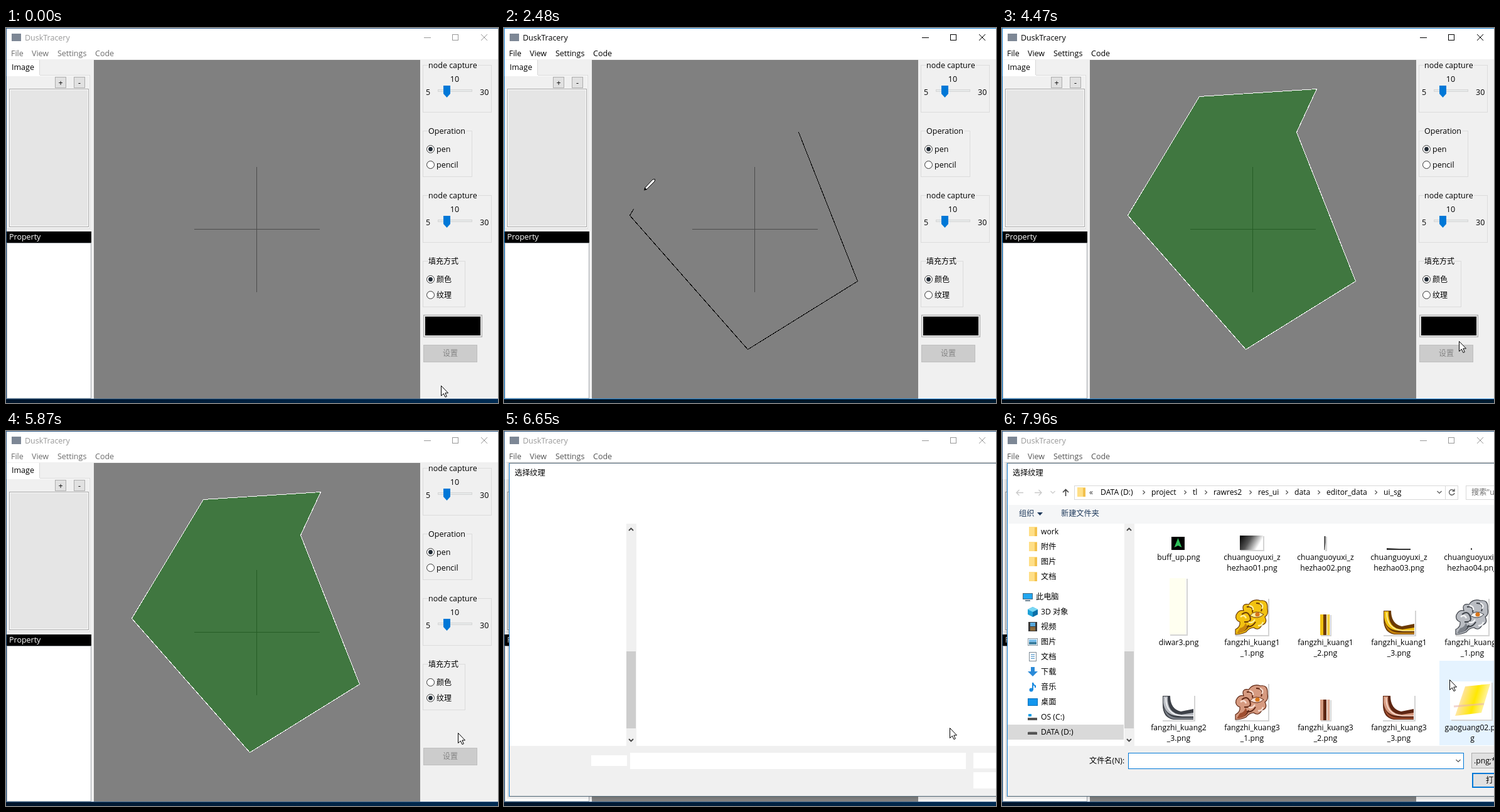
An HTML page that plays this animation: 784x599 px, repeating every 8 s.

```html
<!DOCTYPE html>
<html lang="zh">
<head>
<meta charset="utf-8">
<title>Polygon fill</title>
<style>
html, body { margin: 0; width: 100%; height: 100%; overflow: hidden; background: #f0f0f0; }
svg { display: block; width: 784px; height: 599px; }
text { font: 12.5px "Open Sans", "Noto Sans CJK SC", "Noto Sans CJK", sans-serif; white-space: pre; }
.cjk { font-size: 12px; }
.dlg text { font-size: 12.2px; }
.crisp, rect { shape-rendering: crispEdges; }
</style>
</head>
<body>
<svg id="stage" viewBox="0 0 784 599"></svg>
<script>
const STEP = 77.27, LOOP = 8000;

// Drawing helpers, all returning SVG markup
const box = (x, y, w, h, fill, line) => line
  ? `<rect x="${x + .5}" y="${y + .5}" width="${w - 1}" height="${h - 1}" fill="${fill}" stroke="${line}"/>`
  : `<rect x="${x}" y="${y}" width="${w}" height="${h}" fill="${fill}"/>`;
const text = (x, y, s, fill = '#000', anchor = 'start') =>
  `<text x="${x}" y="${y}" fill="${fill}" text-anchor="${anchor}"${/^[\u4e00-\u9fff]/.test(s) ? ' class="cjk"' : ''}>${s}</text>`;
const path = (d, stroke, width = 1, fill = 'none', extra = '') =>
  `<path d="${d}" stroke="${stroke}" stroke-width="${width}" fill="${fill}" ${extra}/>`;
const shape = (d, fill) => path(d, 'none', 0, fill);
const crisp = 'class="crisp"';
const at = (x, y, s) => `<g transform="translate(${x} ${y})">${s}</g>`;
// Content visible from step a up to step b
const during = (a, b, s) => `<g data-a="${a}" data-b="${b}">${s}</g>`;
const from = (a, s) => during(a, 999, s);
const chevron = (x, y, dir, color = '#555', w = 1.2) => path({
  r: `M${x - 1.5} ${y - 3}l3 3l-3 3`,
  d: `M${x - 3.5} ${y - 2}l3.5 3.5l3.5-3.5`,
  u: `M${x - 3.5} ${y + 2}l3.5-3.5l3.5 3.5`
}[dir], color, w);

// Main window
function frame(ink, menu, edge) {
  const names = { File: 8, View: 41, Settings: 82, Code: 142 };
  return path('M0 .5H784M.5 0V593M0 592.5H784', edge, 1, 'none', crisp) +
    text(30, 20, 'DuskTracery', ink) +
    Object.entries(names).map(([s, x]) => text(x, 45, s, menu)).join('') +
    path('M666 15.5H677M711.5 10.5H720.5V19.5H711.5Z', ink, 1, 'none', crisp) +
    path('M757 10l10 10M767 10l-10 10', ink);
}

function group(x, y, w, h, label, labelWidth) {
  const d = `M${x + 8.5} ${y + .5}H${x + .5}v${h - 1}h${w - 1}v${1 - h}H${x + 8 + labelWidth}`;
  return path(d, '#dcdcdc', 1, 'none', crisp) + text(x + 9, y + 5, label);
}

function slider(y) {
  return group(664, y, 110, 76, 'node capture', 80) +
    text(715, y + 27, '10', '#000', 'middle') + text(669, y + 48, '5') + text(755, y + 48, '30') +
    box(688, y + 39, 55, 4, '#e7eaea', '#d6d6d6') +
    shape(`M697 ${y + 33}h11v13l-5.5 6l-5.5-6z`, '#0078d7');
}

const radio = (y, label) =>
  `<circle cx="676.5" cy="${y}" r="6" fill="#fff" stroke="#333"/>` + text(686, y + 4.5, label);
const dot = y => `<circle cx="676.5" cy="${y}" r="3.4" fill="#222b35"/>`;
const smallButton = (x, s) => box(x, 78, 18, 18, '#e1e1e1', '#adadad') + text(x + 9, 92, s, '#000', 'middle');
const swatch = (fill, line) =>
  box(665, 458, 94, 36, fill, line) + box(668, 461, 88, 30, '#000');

const leftPane =
  box(1, 75, 133, 246, '#f0f0f0', '#dcdcdc') + box(2, 76, 131, 244, 'none', '#fafafa') +
  box(1, 51, 53, 26, '#fff') + path('M53.5 51V75', '#d9d9d9', 1, 'none', crisp) + text(9, 67, 'Image') +
  smallButton(78, '+') + smallButton(108, '-') +
  box(5, 97, 127, 221, '#fff', '#a5a5a5') + box(7, 99, 123, 217, '#e5e5e5') +
  box(1, 343, 135, 249, '#fff', '#a0a5aa') + box(1, 325, 135, 18, '#000') + text(5, 338, 'Property', '#fff');

const rightPane =
  slider(59) + group(664, 164, 79, 74, 'Operation', 62) + radio(193.5, 'pen') + dot(193.5) + radio(218.5, 'pencil') +
  slider(267) + group(664, 372, 68, 74, '填充方式', 0) +
  radio(401.5, '颜色') + radio(426.5, '纹理') + during(0, 69, dot(401.5)) + from(69, dot(426.5)) +
  during(0, 69, swatch('#e1e1e1', '#adadad')) + `<g id="hover">${swatch('#e5f1fb', '#0078d7')}</g>` +
  box(665, 506, 86, 28, '#ccc', '#bfbfbf') + text(708, 524, '设置', '#838383', 'middle');

const corners = [[469, 166], [563, 404], [388, 513], [200, 299], [314, 109], [501, 97]];
const clickSteps = [19, 24, 27, 31, 39];

const canvas =
  box(140, 51, 520, 541, '#808080') +
  path('M399.5 222V422M300 321.5H500', '#4d4d4d', 1, 'none', crisp) +
  `<polyline id="line" fill="none" stroke="#000" ${crisp}/>` +
  from(47, `<polygon points="${corners}" transform="translate(.5 .5)" fill="rgb(0 110 0 / .5)" stroke="#fff" ${crisp}/>`);

const mainWindow =
  `<linearGradient id="desk"><stop stop-color="#00142a"/><stop offset="1" stop-color="#002b52"/></linearGradient>` +
  box(0, 592, 784, 7, 'url(#desk)') + during(3, 76, box(0, 593, 784, 6, 'rgb(0 8 8 / .45)')) +
  box(0, 0, 784, 592, '#f0f0f0') + box(0, 0, 784, 50, '#fff') +
  box(9, 9, 15, 12, '#7d8795') + leftPane + canvas + rightPane +
  during(0, 3, frame('#999', '#6d6d6d', '#2c5a88')) + during(3, 76, frame('#000', '#000', '#1883d7')) +
  during(76, 83, frame('#999', '#6d6d6d', '#2c5a88')) + from(83, frame('#999', '#555', '#2c5a88'));

// File dialog
const folder = (x, y) => box(x, y, 13, 15, '#ffdf87') + box(x + 9, y + 1, 4, 14, '#f2c14e');
const screen = (x, y) => box(x, y, 16, 10, '#22a7f0', '#4a6a80') + box(x + 4, y + 11, 8, 2, '#6a7f8f');
const icons = {
  folder: folder(2, 0),
  pc: screen(0, 2),
  cube: shape('M0 4l8-4l8 4v8l-8 4l-8-4z', '#1fa2d8') + shape('M8 8l8-4v8l-8 4z', '#0c6fa8') + shape('M0 4l8-4l8 4l-8 4z', '#7bd8f4'),
  film: box(1, 0, 14, 15, '#3a3a3a') + box(4, 1, 8, 6, '#58a9dc') + box(4, 8, 8, 6, '#8a6a3a'),
  photo: box(0, 2, 16, 12, '#fff', '#8a9aa5') + box(2, 4, 12, 4, '#7cc0ec') + box(2, 8, 12, 4, '#3d7f9f'),
  page: box(2, 0, 12, 15, '#fff', '#7d8b96') + path('M5 4.5h6M5 7.5h6M5 10.5h6', '#3c8ac4'),
  down: shape('M5 0h6v7h5l-8 8l-8-8h5z', '#2a8ad8'),
  note: path('M8 13V1q1 4 4 5v3', '#1b8be0', 2) + `<circle cx="5.5" cy="12.5" r="3" fill="#1b8be0"/>`,
  desk: box(0, 2, 16, 12, '#1296ee', '#0a6fb8'),
  disk: box(0, 8, 15, 4, '#555') + box(1, 7, 13, 1, '#aaa'),
  sys: box(0, 9, 15, 4, '#555') + box(1, 3, 5, 4, '#1aa0e8')
};
const treeRows = [
  [161, 'folder', 'work'], [185, 'folder', '附件'], [209, 'folder', '图片'], [233, 'folder', '文档'],
  [265, 'pc', '此电脑'], [289, 'cube', '3D 对象'], [313, 'film', '视频'], [337, 'photo', '图片'],
  [361, 'page', '文档'], [385, 'down', '下载'], [409, 'note', '音乐'], [433, 'desk', '桌面'],
  [457, 'sys', 'OS (C:)'], [481, 'disk', 'DATA (D:)']
];
const tree = box(9, 469, 185, 24, '#d9d9d9') + treeRows.map(([y, icon, label]) => {
  const x = icon === 'pc' ? 33 : 41;
  return at(x, y - 8, icons[icon]) + text(x + 21, y + 4, label);
}).join('');

const crumbs = { 'DATA (D:)': 157, project: 238, tl: 304, rawres2: 337, res_ui: 408, data: 466, editor_data: 517, ui_sg: 608 };
const addressBar =
  path('M34 98.5H23M27.5 94l-4.5 4.5l4.5 4.5M52 98.5H63M58.5 94l4.5 4.5l-4.5 4.5', '#c9c9c9', 1.3) +
  chevron(81, 98, 'd', '#c9c9c9') + path('M101.5 104V93.5M97 98l4.5-4.5l4.5 4.5', '#444', 1.6) +
  box(115, 87, 612, 23, '#fff', '#d9d9d9') + path('M706.5 87V110', '#d9d9d9', 1, 'none', crisp) + folder(120, 90) +
  text(139, 102, '«', '#333') +
  Object.entries(crumbs).map(([s, x], i) => text(x, 102, s) + (i ? chevron(x - 12, 98, 'r') : '')).join('') +
  chevron(697, 98, 'd') + path('M720 95a4.3 4.3 0 1 0 1 4M721 92.5v3.5h-3.5', '#555', 1.3) +
  box(739, 87, 60, 23, '#fff', '#d9d9d9') + text(748, 102, '搜索"ui_sg"', '#6d6d6d');

const toolbar = text(27, 136, '组织', '#1e395b') + shape('M56 130h9l-4.5 5z', '#1e395b') + text(94, 136, '新建文件夹', '#1e395b');
const scrollbar = box(195, 148, 16, 355, '#f0f0f0') + box(195, 352, 15, 123, '#cdcdcd') +
  chevron(202.5, 157, 'u', '#444', 1.8) + chevron(202.5, 494, 'd', '#444', 1.8);

const footer =
  box(138, 515, 60, 24, '#f0f0f0') + text(139, 531, '文件名(N):') +
  box(201, 514, 535, 26, '#fff', '#0078d7') + chevron(727, 527, 'd') +
  box(748, 514, 40, 57, '#f0f0f0') + box(748, 514, 60, 25, '#e1e1e1', '#adadad') + text(752, 531, '.png;*.jpg') +
  box(749, 546, 60, 24, '#0078d7') + box(751, 548, 60, 20, '#e1e1e1') + text(771, 562, '打开');

// Thumbnails
const gold = ['#f2c211', '#6b3a06', '#fff0a0', '#c8860c'];
const silver = ['#b9bcc2', '#3d4148', '#f4f5f7', '#7d828a'];
const copper = ['#d69a80', '#5e2613', '#f8ddd0', '#a04f30'];
const card = (x, y, w, h) => box(x + 1, y + 1, w + 1, h + 1, '#d4d4d4') + box(x - 1, y - 1, w + 1, h + 1, '#fff');
const ornament = (x, y, [mid, dark, light, low]) => card(x, y, 53, 59) + at(x, y,
  path('M1 58V50Q9 46 8 38Q0 35 2 27Q6 18 14 20Q10 8 22 10Q29 0 41 4Q53 2 52 17Q54 26 48 30Q53 40 43 43Q38 53 30 47Q22 48 18 54Q10 58 1 58Z', dark, 1.2, mid) +
  path('M11 26q9-7 13 3t-9 9M19 14q11-2 9 9M34 8q13 0 8 13M16 44q10 5 17-6M5 55q14-2 17-12', dark, 2) +
  path('M9 30q6-5 9 2M23 12q7 1 6 7M40 8q7 3 3 9M22 38q6 3 10-4M37 44q7 0 8-6', light, 2.4) +
  path('M24 28q9-11 22-2q-9 9-22 2z', dark, 1, light) + `<circle cx="36" cy="26" r="3.6" fill="#d8761c"/>` +
  shape('M8 48q8-2 9-9q6 8-4 15q-6 2-10 2z', low));
const bar = (x, y, [mid, dark, light]) => card(x, y, 16, 33) +
  box(x, y, 6, 33, mid) + box(x + 5, y, 5, 33, dark) + box(x + 11, y, 4, 33, mid) + box(x + 12, y, 1, 33, light);
const bend = (x, y, [mid, dark, light, low]) => card(x, y, 51, 40) + at(x, y,
  shape('M1 1H13Q13 22 30 26L50 22V39H18Q1 36 1 15Z', dark) +
  shape('M2 2H9Q8 30 31 31L50 28V33H24Q4 31 2 12Z', mid) + shape('M3 20Q10 36 26 36H50V38H18Q5 34 3 20Z', low) +
  path('M6 4Q6 31 32 33H50', light, 1.6));
const gradient = (id, stops, turn) => `<linearGradient id="${id}" gradientTransform="rotate(${turn})">` +
  stops.map((c, i) => `<stop offset="${i / (stops.length - 1)}" stop-color="${c}"/>`).join('') + '</linearGradient>';

const seal = n => ['chuanguoyuxi_z', `hezhao0${n}.png`];
const rim = (set, n) => [`fangzhi_kuang${set}`, `_${n}.png`];
const files = [
  [['buff_up.png'], box(270, 169, 21, 21, '#000') + shape('M280.500 171l6 15l-6-3l-6 3z', '#2fc05a')],
  [seal('1'), card(379, 167, 37, 23) + gradient('fog', ['#000', '#555', '#fff'], 20) + box(379, 167, 37, 23, 'url(#fog)')],
  [seal('2'), card(514, 168, 2, 22) + shape('M513.500 168h2v10l-1 12h-1z', '#333')],
  [seal('3'), shape('M613 187l20 1h18v2h-38z', '#333')],
  [seal('4'), box(747, 187, 2, 3, '#555')],
  [['diwar3.png'], card(267, 235, 27, 90) + box(267, 235, 26, 90, '#fffff0')],
  [rim(1, 1), ornament(371, 267, gold)], [rim(1, 2), bar(507, 293, gold)],
  [rim(1, 3), bend(607, 286, gold)], [rim(2, 1), ornament(722, 267, silver)],
  [rim(2, 3), bend(255, 422, silver)], [rim(3, 1), ornament(371, 403, copper)],
  [rim(3, 2), bar(507, 429, copper)], [rim(3, 3), bend(606, 422, copper)],
  [['gaoguang02.pn', 'g'], card(715, 401, 65, 60) + gradient('shine', ['#fff', '#ffe48a', '#ffe800', '#fff4b0'], 15) +
    shape('M738 408L778 404L764 450L722 455Z', 'url(#shine)') + path('M720 440L768 436', '#e8b8b0', 3, 'none', 'opacity=".6"')]
];
const fileGrid = files.map(([lines, thumb], i) => {
  const x = 281.500 + i % 5 * 117, y = 206 + Math.floor(i / 5) * 136;
  return from(97 + Math.floor(i / 4), thumb) + from(95, lines.map((s, n) => text(x, y + n * 17, s, '#000', 'middle')).join(''));
}).join('');

const dialog = `<g id="dialog" class="dlg">` +
  box(4, 49, 1000, 539, 'rgb(0 0 0 / .06)') + box(6, 50, 1000, 535, 'rgb(0 0 0 / .1)') +
  box(8, 51, 984, 533, '#fff', '#59707f') + box(8, 51, 1, 533, '#1883d7') +
  box(9, 503, 980, 80, '#f0f0f0') + text(17, 71, '选择纹理') +
  box(139, 518, 57, 17, '#fff') + box(201, 514, 535, 26, '#fff') + box(748, 514, 60, 25, '#fff') + box(748, 545, 60, 26, '#fff') +
  from(85, scrollbar) + from(89, box(9, 118, 980, 30, '#f5f6f7') + addressBar + footer) +
  during(90, 97, box(205, 518, 1, 18, '#000')) + from(94, toolbar + tree) +
  from(97, box(697, 367, 100, 135, '#e5f3ff')) + fileGrid + '</g>';

const cursors =
  `<g id="arrow">${path('M.5.500V16.500L4.300 13L7 18.600L9.300 17.500L6.800 12H11.500Z', '#000', 1, '#fff')}</g>` +
  `<g id="pen">${path('M1-3L14-17L17.500-17.500L17-14L4-1Z', '#000', 1, '#fff') + shape('M0 .500L1.200-4.500L5-1Z', '#000')}</g>`;

const stage = document.getElementById('stage');
stage.innerHTML = mainWindow + dialog + cursors;
const [hover, line, dialogNode, arrow, pen] = ['hover', 'line', 'dialog', 'arrow', 'pen'].map(id => document.getElementById(id));
const timed = [...stage.querySelectorAll('[data-a]')];
const show = (node, on) => { node.style.display = on ? '' : 'none'; };

// Pointer stops: step, x, y
const track = [
  [0, 693, 571], [1, 687, 560], [4, 460, 355], [8, 197, 187], [10, 215, 181], [11, 252, 183], [14, 470, 168],
  [18, 470, 168], [19, 490, 201], [20, 515, 262], [22, 571, 390], [23, 563, 404], [24, 563, 404], [26, 388, 513],
  [27, 388, 513], [30, 200, 299], [31, 200, 299], [34, 270, 180], [36, 330, 76], [38, 314, 109], [39, 314, 109],
  [42, 490, 98], [43, 501, 97], [44, 502, 98], [49, 502, 98], [52, 739, 434], [53, 739, 434], [58, 725, 517],
  [62, 695, 422], [69, 695, 422], [74, 720, 482], [84, 720, 482], [86, 710, 474], [97, 710, 474], [103, 713, 397], [110, 713, 397]
];
function pointer(k) {
  const i = track.findIndex(p => p[0] > k), [a, x, y] = track[i - 1], [b, u, v] = track[i];
  const p = (k - a) / (b - a);
  return [x + (u - x) * p, y + (v - y) * p].map(Math.round);
}

function render(now) {
  const k = Math.floor((now % LOOP + 10) / STEP);
  const [x, y] = pointer(k);
  timed.forEach(n => show(n, k >= n.dataset.a && k < n.dataset.b));

  const drawing = k < 52 && x >= 140 && x < 660;
  show(pen, drawing);
  show(arrow, !drawing);
  (drawing ? pen : arrow).setAttribute('transform', `translate(${x} ${y})`);
  show(hover, k > 53 && k < 69 && y >= 458 && y < 494);

  const placed = clickSteps.filter(s => k >= s).length;
  show(line, placed && k < 47);
  if (placed) line.setAttribute('points', [...corners.slice(0, placed), pointer(k - .75)].map(p => p.map(n => n + .5)).join(' '));

  show(dialogNode, k >= 83);
  const [scale, alpha] = { 83: [.965, .35], 84: [.987, .717], 85: [.996, .93] }[k] || [1, 1];
  dialogNode.setAttribute('transform', `translate(500 317) scale(${scale}) translate(-500 -317)`);
  dialogNode.setAttribute('opacity', alpha);
}

const start = performance.now();
function tick() {
  render(performance.now() - start);
  requestAnimationFrame(tick);
}
tick();
</script>
</body>
</html>
```
